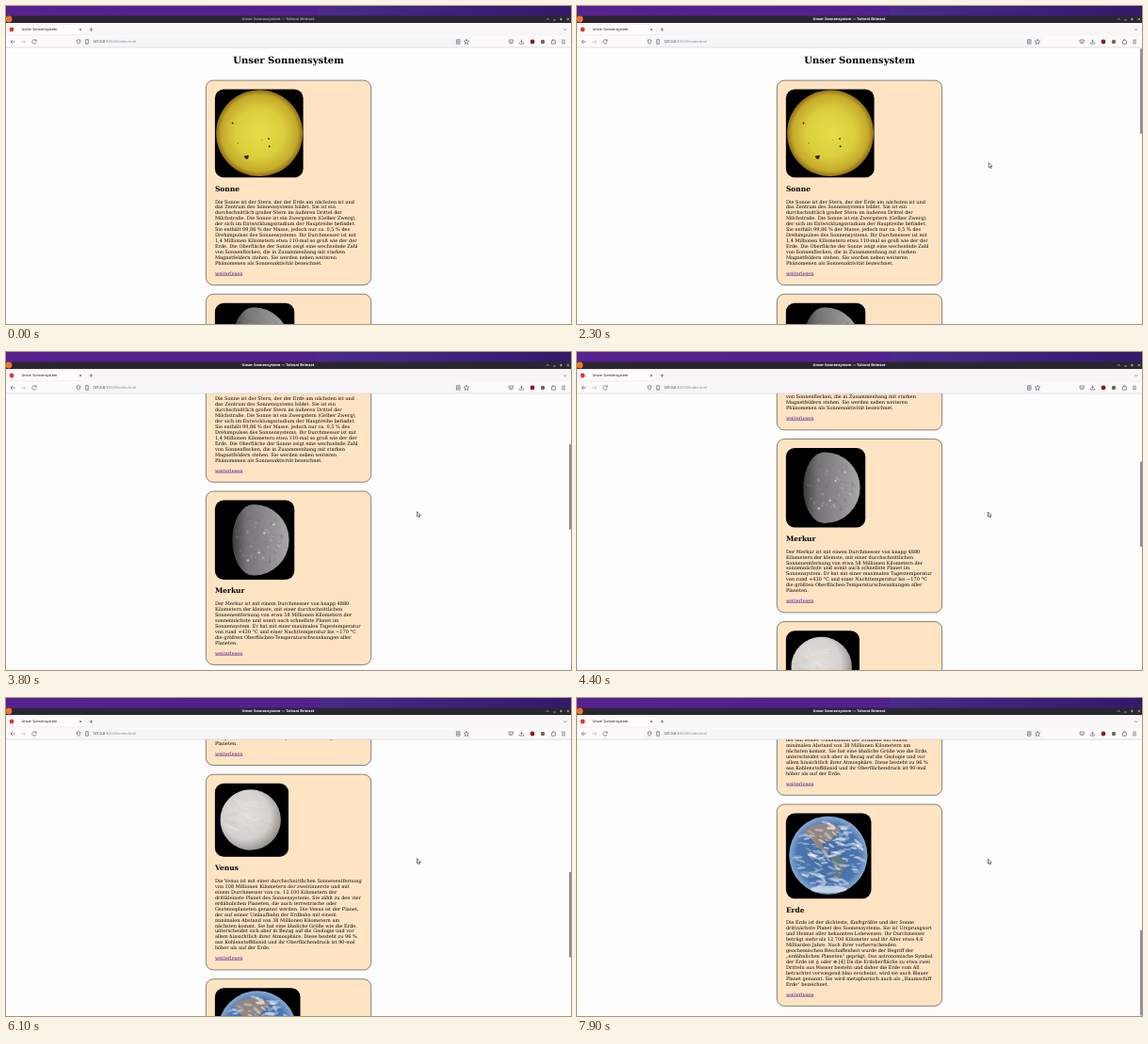
Animation of 600 by 338 pixels, one loop 8 s. Source, as an HTML page:

```html
<!DOCTYPE html>
<html lang="de">
<head>
<meta charset="utf-8">
<style>
html, body { margin: 0; width: 100%; height: 100%; overflow: hidden; background: #fff; }
svg { display: block; width: 600px; height: 338px; }
text { text-rendering: geometricPrecision; white-space: pre; }
.page text { font: 16px "DejaVu Serif", "DejaVu Sans", serif; fill: #000; }
.page .h1 { font-size: 32px; font-weight: bold; text-anchor: middle; }
.page .h2 { font-size: 24px; font-weight: bold; }
.page .link { fill: #551a8b; text-decoration: underline; }
.ui text { font: 3.8px "Noto Sans", "Open Sans", sans-serif; fill: #15141a; }
.ui .title { font-size: 3.9px; font-weight: bold; text-anchor: middle; }
.icon { fill: none; stroke: #4a4a52; stroke-width: .6; }
</style>
</head>
<body>
<svg viewBox="0 0 600 338">
  <defs>
    <clipPath id="view"><rect y="44" width="600" height="294"/></clipPath>
    <linearGradient id="desk">
      <stop offset="0" stop-color="#57228f"/><stop offset="1" stop-color="#4d2090"/>
    </linearGradient>
    <linearGradient id="deskRight">
      <stop offset="0" stop-color="#4a2b8c"/><stop offset="1" stop-color="#331a6c"/>
    </linearGradient>
    <radialGradient id="sun">
      <stop offset="0" stop-color="#e6dd47"/><stop offset=".55" stop-color="#dccf3e"/>
      <stop offset=".88" stop-color="#c4aa2b"/><stop offset="1" stop-color="#8f6d12"/>
    </radialGradient>
    <linearGradient id="mercury">
      <stop offset="0" stop-color="#3c3b3d"/><stop offset=".25" stop-color="#757376"/>
      <stop offset=".7" stop-color="#939194"/><stop offset="1" stop-color="#a9a7a9"/>
    </linearGradient>
    <radialGradient id="venus" cx=".42" cy=".42" r=".62">
      <stop offset="0" stop-color="#e4e1dd"/><stop offset=".65" stop-color="#d3d0cd"/>
      <stop offset="1" stop-color="#8d8a88"/>
    </radialGradient>
    <radialGradient id="earth">
      <stop offset="0" stop-color="#45699f"/><stop offset=".8" stop-color="#4a76b0"/>
      <stop offset="1" stop-color="#86abd2"/>
    </radialGradient>
  </defs>
  <rect width="600" height="338" fill="#fdfdfd"/>
  <g clip-path="url(#view)">
    <g id="page" class="page"><text class="h1" x="960" y="195">Unser Sonnensystem</text></g>
    <rect id="thumb" x="598" width="2" height="91" rx="1" fill="#8f8f93"/>
  </g>
  <g class="ui">
    <rect width="600" height="11" fill="url(#desk)"/>
    <path d="M334 0H600V11H331z" fill="url(#deskRight)"/>
    <rect y="10.5" width="600" height="7.5" fill="#2a2630"/>
    <circle cx="3" cy="14" r="3.4" fill="#f0752b"/>
    <text id="title" class="title" x="289" y="15.4">Unser Sonnensystem — Talvoni Brimset</text>
    <path class="icon" style="stroke:#ddd" d="M573.8 14.8l1.5-1.6 1.5 1.6M581 15h2.8M588 14h2.8M589.4 12.6v2.8M595.5 12.7l2.6 2.6m0-2.6l-2.6 2.6"/>
    <rect y="18" width="600" height="14" fill="#f9f6f8"/>
    <rect x="1" y="19.3" width="83" height="11.4" rx="1.3" fill="#fffbfc" stroke="#e2dfe4" stroke-width=".4"/>
    <circle cx="6" cy="25" r="2.4" fill="#e5332f"/>
    <text x="16.5" y="26.4">Unser Sonnensystem</text>
    <path class="icon" d="M77.8 23.8l2.4 2.4m0-2.4l-2.4 2.4M88.6 25h3.6M90.4 23.2v3.6M592.2 24.3l1.5 1.5 1.5-1.5"/>
    <rect y="32" width="600" height="12" fill="#fcfafb"/>
    <rect x="72.5" y="33" width="422" height="10" rx="1.3" fill="#f6f5f8"/>
    <path d="M0 44H600" stroke="#c9c9ce" stroke-width=".6"/>
    <path class="icon" d="M9.7 38H5m2-2l-2 2 2 2"/>
    <path class="icon" style="stroke:#bbb" d="M16 38h4.7m-2-2l2 2-2 2"/>
    <path class="icon" d="M31.8 36.6a2.2 2.2 0 1 0 .3 2M32.2 35.4v1.7h-1.7"/>
    <path class="icon" d="M77 35.7l1.9.7q0 3-1.9 4-1.9-1-1.9-4zM84.7 35.7h2.6v4.6h-2.6zM478.4 35.8h3.6v4.4h-3.6zM479.3 37.2h1.8m-1.8 1.4h1.8"/>
    <path class="icon" d="M489 35.4l.8 1.7 1.8.2-1.3 1.3.3 1.9-1.6-.9-1.6.9.3-1.9-1.3-1.3 1.8-.2z"/>
    <text x="92" y="39.4">127.0.0.1<tspan fill="#8a8a92">:5500/index.html</tspan></text>
    <path class="icon" d="M534 36h4.4v1.6a2.2 2.2 0 0 1-4.4 0zM535 37.4l1.2 1.1 1.2-1.1M547.5 35.6v3m-1.4-1.4l1.4 1.4 1.4-1.4M545.3 38.7v1.4h4.4v-1.4"/>
    <circle cx="559" cy="38" r="2.4" fill="#8c1622"/>
    <circle cx="570" cy="38" r="2.2" fill="#75683f"/>
    <path class="icon" d="M579.4 37h1.2v-1.2h1.4V37h1.4v3.2h-4zM590 36.2h4M590 38h4M590 39.8h4"/>
  </g>
  <path id="cursor" d="M0 0v5.2l1.2-1.1.9 1.9.9-.4-.9-1.8h1.7z" fill="#fff" stroke="#222" stroke-width=".6"/>
</svg>
<script>
const NS = 'http://www.w3.org/2000/svg';
const SCALE = 0.3125, LOOP = 8000, LEFT = 679, WIDTH = 562, LINE = 19;
const byId = id => document.getElementById(id);

function add(parent, tag, attrs, content) {
  const el = document.createElementNS(NS, tag);
  for (const key in attrs) el.setAttribute(key, attrs[key]);
  if (content) el.textContent = content;
  return parent.appendChild(el);
}

function seeded(seed) {
  return () => (seed = seed * 16807 % 2147483647) / 2147483647;
}

// Scatters small streaks over a disc.
function speckle(g, { cx, cy, r, count, size, flat, tilt, colors, opacity, seed }) {
  const rnd = seeded(seed);
  for (let i = 0; i < count; i++) {
    const a = rnd() * 2 * Math.PI, d = Math.sqrt(rnd()) * r;
    const x = cx + d * Math.cos(a), y = cy + d * Math.sin(a);
    const rx = size * (.3 + rnd());
    add(g, 'ellipse', {
      cx: x, cy: y, rx, ry: rx * flat, opacity: opacity * (.4 + rnd() * .6),
      fill: colors[i % colors.length], transform: `rotate(${tilt + (rnd() - .5) * 70} ${x} ${y})`
    });
  }
}

function drawSun(g) {
  add(g, 'circle', { cx: 151, cy: 149, r: 147, fill: 'url(#sun)' });
  for (const [cx, cy, r] of [[108, 231, 6], [104, 229, 4], [112, 227, 3], [60, 115, 3],
    [183, 168, 3], [185, 194, 3], [78, 183, 1.8], [160, 172, 1.5]])
    add(g, 'circle', { cx, cy, r, fill: '#2b2005' });
}

function drawMercury(g) {
  add(g, 'path', { d: 'M131 14A121 121 0 0 1 131 256A72 121 0 0 1 131 14', fill: 'url(#mercury)' });
  speckle(g, { cx: 155, cy: 135, r: 88, count: 110, size: 6, flat: .6, tilt: 60,
    colors: ['#c9c7c9', '#69676a', '#8b8380'], opacity: .4, seed: 31 });
  for (const [cx, cy] of [[200, 82], [150, 178], [168, 112], [112, 205]])
    add(g, 'circle', { cx, cy, r: 4, fill: '#d8d6d8', opacity: .75 });
}

function drawVenus(g) {
  add(g, 'circle', { cx: 121, cy: 124, r: 103, fill: 'url(#venus)' });
  speckle(g, { cx: 118, cy: 122, r: 72, count: 36, size: 24, flat: .16, tilt: 20,
    colors: ['#f2efeb', '#e3cdb0', '#c9c5c2'], opacity: .4, seed: 77 });
}

function drawEarth(g) {
  add(g, 'circle', { cx: 144, cy: 143, r: 133, fill: 'url(#earth)' });
  add(g, 'path', { d: 'M62 62Q100 28 160 34L186 58 164 78 150 96 128 92 122 112 146 130 138 136 104 112 84 82z', fill: '#a28a78', opacity: .85 });
  add(g, 'path', { d: 'M150 140Q188 142 206 172L186 216 170 234 160 190z', fill: '#75806f', opacity: .6 });
  speckle(g, { cx: 144, cy: 143, r: 112, count: 150, size: 15, flat: .28, tilt: 15,
    colors: ['#eef2f7', '#cfdae8', '#ffffff'], opacity: .6, seed: 19 });
  add(g, 'ellipse', { cx: 146, cy: 258, rx: 62, ry: 12, fill: '#e8eef5', opacity: .7 });
}

const planets = [
  { name: 'Sonne', size: 300, draw: drawSun, text: `Die Sonne ist der Stern, der der Erde am nächsten ist und
das Zentrum des Sonnensystems bildet. Sie ist ein
durchschnittlich großer Stern im äußeren Drittel der
Milchstraße. Die Sonne ist ein Zwergstern (Gelber Zwerg),
der sich im Entwicklungsstadium der Hauptreihe befindet.
Sie enthält 99,86 % der Masse, jedoch nur ca. 0,5 % des
Drehimpulses des Sonnensystems. Ihr Durchmesser ist mit
1,4 Millionen Kilometern etwa 110-mal so groß wie der der
Erde. Die Oberfläche der Sonne zeigt eine wechselnde Zahl
von Sonnenflecken, die in Zusammenhang mit starken
Magnetfeldern stehen. Sie werden neben weiteren
Phänomenen als Sonnenaktivität bezeichnet.` },
  { name: 'Merkur', size: 270, draw: drawMercury, text: `Der Merkur ist mit einem Durchmesser von knapp 4880
Kilometern der kleinste, mit einer durchschnittlichen
Sonnenentfernung von etwa 58 Millionen Kilometern der
sonnennächste und somit auch schnellste Planet im
Sonnensystem. Er hat mit einer maximalen Tagestemperatur
von rund +430 °C und einer Nachttemperatur bis −170 °C
die größten Oberflächen-Temperaturschwankungen aller
Planeten.` },
  { name: 'Venus', size: 250, draw: drawVenus, text: `Die Venus ist mit einer durchschnittlichen Sonnenentfernung
von 108 Millionen Kilometern der zweitinnerste und mit
einem Durchmesser von ca. 12.100 Kilometern der
drittkleinste Planet des Sonnensystems. Sie zählt zu den vier
erdähnlichen Planeten, die auch terrestrische oder
Gesteinsplaneten genannt werden. Die Venus ist der Planet,
der auf seiner Umlaufbahn der Erdbahn mit einem
minimalen Abstand von 38 Millionen Kilometern am
nächsten kommt. Sie hat eine ähnliche Größe wie die Erde,
unterscheidet sich aber in Bezug auf die Geologie und vor
allem hinsichtlich ihrer Atmosphäre. Diese besteht zu 96 %
aus Kohlenstoffdioxid und ihr Oberflächendruck ist 90-mal
höher als auf der Erde.` },
  { name: 'Erde', size: 290, draw: drawEarth, text: `Die Erde ist der dichteste, fünftgrößte und der Sonne
drittnächste Planet des Sonnensystems. Sie ist Ursprungsort
und Heimat aller bekannten Lebewesen. Ihr Durchmesser
beträgt mehr als 12.700 Kilometer und ihr Alter etwa 4,6
Milliarden Jahre. Nach ihrer vorherrschenden
geochemischen Beschaffenheit wurde der Begriff der
„erdähnlichen Planeten“ geprägt. Das astronomische Symbol
der Erde ist ♁ oder ⊕.[4] Da die Erdoberfläche zu etwa zwei
Dritteln aus Wasser besteht und daher die Erde vom All
betrachtet vorwiegend blau erscheint, wird sie auch Blauer
Planet genannt. Sie wird metaphorisch auch als „Raumschiff
Erde“ bezeichnet.` }
];

const page = byId('page');

// Draws one planet card and returns the top of the next one.
function drawCard(cardTop, { name, size, draw, text }) {
  const lines = text.split('\n');
  const body = size + 103, height = body + lines.length * LINE + 66;
  const card = add(page, 'g', { transform: `translate(${LEFT} ${cardTop})` });
  add(card, 'rect', { x: .5, y: .5, width: WIDTH - 1, height: height - 1, rx: 25, fill: '#ffe4c4', stroke: '#111', 'stroke-width': 1.6 });
  const picture = add(card, 'g', { transform: 'translate(31 31)' });
  add(picture, 'rect', { width: size, height: size, rx: 30, fill: '#000' });
  draw(picture);
  add(card, 'text', { class: 'h2', x: 31, y: size + 77.5 }, name);
  lines.forEach((line, i) => add(card, 'text', { x: 31, y: body + 15 + i * LINE }, line));
  add(card, 'text', { class: 'link', x: 31, y: body + 31 + lines.length * LINE }, 'weiterlesen');
  return cardTop + height + 30;
}
planets.reduce(drawCard, 252.5);

// Each track lists [time, value] pairs.
const scrollTrack = [[2300, 0], [3200, 102.8], [4400, 213.7], [5400, 344.2], [6900, 504.7], [7900, 604.8]];
const cursorX = [[900, 410], [1800, 437.2], [2300, 437.2], [3200, 436.5], [6900, 436.5]];
const cursorY = [[900, 6], [1800, 166.5], [2300, 166.5], [3200, 169.5], [6900, 171]];

function sample(track, t) {
  if (t <= track[0][0]) return track[0][1];
  for (let i = 1; i < track.length; i++) {
    const [t0, a] = track[i - 1], [t1, b] = track[i];
    if (t <= t1) return a + (b - a) * (t - t0) / (t1 - t0);
  }
  return track[track.length - 1][1];
}

function render(ms) {
  const t = Math.floor(ms % LOOP / 100) * 100;
  const scroll = sample(scrollTrack, t);
  page.setAttribute('transform', `translate(0 ${-scroll}) scale(${SCALE})`);
  byId('thumb').setAttribute('y', 45 + scroll / 3);
  byId('thumb').setAttribute('opacity', t < 1000 ? 0 : 1);
  byId('title').style.fill = t < 500 ? '#a5a2a8' : '#fff';
  const cursor = byId('cursor');
  cursor.setAttribute('transform', `translate(${sample(cursorX, t)} ${sample(cursorY, t)})`);
  cursor.setAttribute('opacity', t < 900 ? 0 : 1);
}

let start;
function tick(now) {
  start ??= now;
  render(now - start);
  requestAnimationFrame(tick);
}
render(0);
requestAnimationFrame(tick);
</script>
</body>
</html>
```
